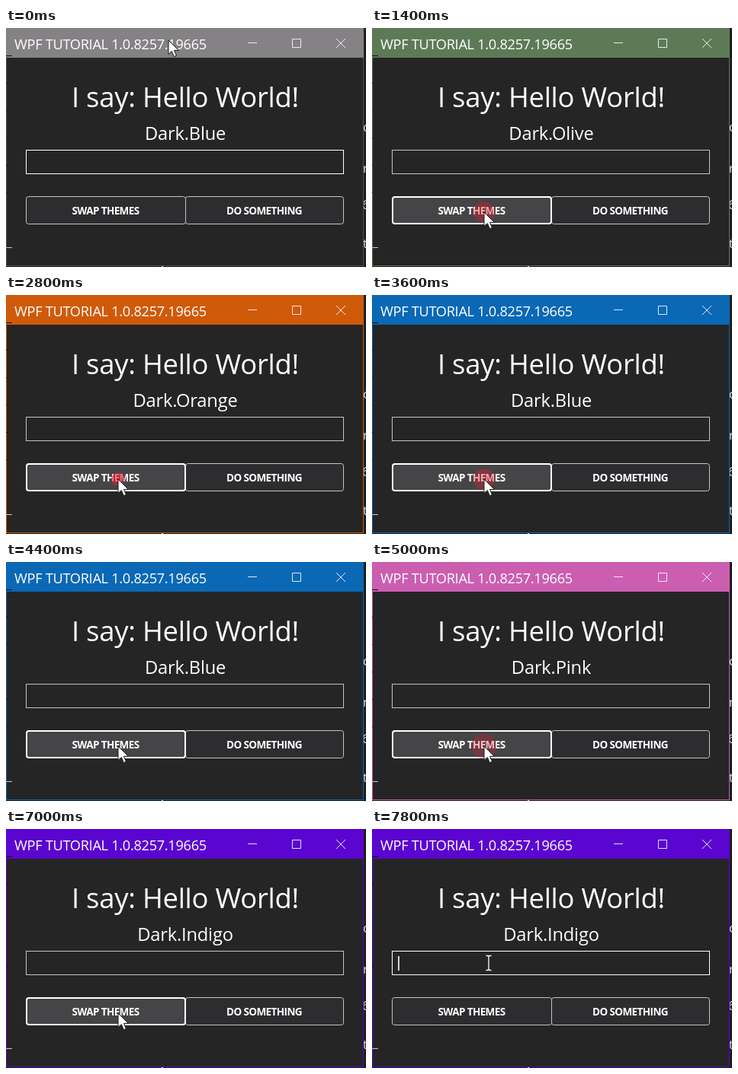
Write an HTML page that moves like this. It is 472x314 px and loops after 8 s.

```html
<!DOCTYPE html>
<html lang="en">
<head>
<meta charset="utf-8">
<title>Theme swapping</title>
<style>
  html, body { margin: 0; width: 100%; height: 100%; overflow: hidden; background: #1e1e1e; }
  svg { display: block; width: 100vw; height: 100vh; }
  text { font-family: "Open Sans", "Noto Sans", sans-serif; fill: #fff; }
  .mid { text-anchor: middle; }
  .title { font-size: 18.2px; letter-spacing: -.3px; }
  .head { font-size: 36.4px; letter-spacing: -.25px; }
  .label { font-size: 23.7px; letter-spacing: -.2px; }
  .cap { font-size: 13.5px; font-weight: 700; letter-spacing: -.6px; }
  .behind text { font-size: 16px; fill: #ddd; }
</style>
</head>
<body>
<svg viewBox="0 0 472 314">
  <rect width="472" height="314" fill="#1e1e1e"/>
  <g class="behind">
    <text x="468" y="136">c</text>
    <text x="468" y="190">r</text>
    <text x="467" y="238">6</text>
    <text x="468" y="289">t</text>
  </g>
  <path d="M204 313.5h2" stroke="#ddd"/>

  <rect width="469" height="313" fill="#252525"/>
  <rect id="edge" x=".5" y=".5" width="468" height="312" fill="none"/>
  <rect id="bar" width="469" height="39"/>
  <path d="M0 36.5h8M0 72.5h2M0 108.5h1M0 144.5h1M0 180.5h2M0 216.5h1" stroke="#111"/>
  <path d="M0 288.5h8" stroke="#ccc"/>

  <text class="title" x="11" y="27.5">WPF TUTORIAL 1.0.8257.19665</text>
  <path fill="none" stroke="#fff" stroke-opacity=".85"
    d="M317 19.5h12M375.5 14.5h11v11h-11zM433 14l12 12M445 14l-12 12"/>

  <text class="head mid" x="235" y="104">I say: Hello World!</text>
  <text class="label mid" id="name" x="235" y="147"></text>

  <rect id="box" x="26.5" y="160.5" width="416" height="31" fill="none"/>
  <path id="caret" d="M35 167v19" stroke="#fff" stroke-width="1.6"/>

  <rect x="235.5" y="221.5" width="207" height="36" rx="3" fill="#2d2d30" stroke="#c4c4c4"/>
  <rect id="swap" rx="3"/>
  <text class="cap mid" x="130.5" y="244.8">SWAP THEMES</text>
  <text class="cap mid" x="338.5" y="244.8">DO SOMETHING</text>

  <circle id="ripple" cx="147" cy="242" fill="#e01c2c"/>
  <path id="arrow" d="M0 0v18.5l4.3-4 3 7.2 3.2-1.4-3-6.9h5.8z" fill="#fff" stroke="#151515"/>
  <path id="beam" d="M-3.5-9.5h2.5l1 1 1-1h2.5M0-8.5v17M-3.5 9.5h2.5l1-1 1 1h2.5"
    fill="none" stroke="#fff" stroke-width="1.3"/>
</svg>
<script>
const LOOP = 8000, STEP = 200;
const themes = [
  [0, "Blue", "#858285"],
  [1250, "Olive", "#5d7a57"],
  [2750, "Orange", "#cf5a0a"],
  [3420, "Blue", "#0a68b5"],
  [4740, "Pink", "#cb5eb0"],
  [5550, "Magenta", "#b40462"],
  [6350, "Indigo", "#5a05d0"]
];
const presses = [1080, 2650, 3270, 4580, 5380, 6180];
const HOLD = 150, FADE = 560;
const path = [[200, 213, 16], [1000, 147, 242], [7150, 147, 242], [7600, 153, 176]];

const $ = id => document.getElementById(id);
const set = (id, attrs) => {
  for (const k in attrs) $(id).setAttribute(k, attrs[k]);
};
const show = (id, on) => set(id, { visibility: on ? "visible" : "hidden" });
const ease = u => u * u * (3 - 2 * u);

function pointer(t) {
  if (t <= path[0][0]) return path[0].slice(1);
  for (let i = 1; i < path.length; i++) {
    const [t0, x0, y0] = path[i - 1], [t1, x1, y1] = path[i];
    if (t < t1) {
      const u = ease((t - t0) / (t1 - t0));
      return [x0 + (x1 - x0) * u, y0 + (y1 - y0) * u];
    }
  }
  return path[path.length - 1].slice(1);
}

function drawButton(hover, pressed) {
  const b = hover ? 1 : .5;
  set("swap", {
    x: 26 + b, y: 221 + b, width: 210 - 2 * b, height: 37 - 2 * b,
    fill: pressed ? "#7f7b80" : hover ? "#454547" : "#2d2d30",
    stroke: hover ? "#fff" : "#c4c4c4",
    "stroke-width": 2 * b
  });
}

function draw(t) {
  const active = t >= themes[1][0];
  const [, name, color] = themes.filter(th => th[0] <= t).pop();
  set("bar", { fill: color });
  set("edge", { stroke: active ? color : "#555355" });
  $("name").textContent = "Dark." + name;

  const [x, y] = pointer(t);
  const overBox = x > 26 && x < 443 && y > 160 && y < 192;
  const hover = x > 26 && x < 235 && y > 221 && y < 258;
  const typing = t >= 7600;

  const age = t - (presses.filter(p => p <= t).pop() ?? -LOOP);
  drawButton(hover, age < HOLD);
  set("box", { stroke: !active || overBox || typing ? "#fff" : "#c4c4c4" });
  show("caret", typing);

  show("ripple", age < FADE);
  if (age < FADE) set("ripple", { r: 4.5 + age * .029, opacity: .8 * (1 - age / 650) });

  const at = { transform: `translate(${x.toFixed(1)} ${y.toFixed(1)})` };
  set("arrow", at);
  set("beam", at);
  show("arrow", !overBox);
  show("beam", overBox);
}

const start = performance.now();
function tick() {
  const t = (performance.now() - start) % LOOP;
  draw(Math.floor(t / STEP) * STEP);
  requestAnimationFrame(tick);
}
tick();
</script>
</body>
</html>
```
